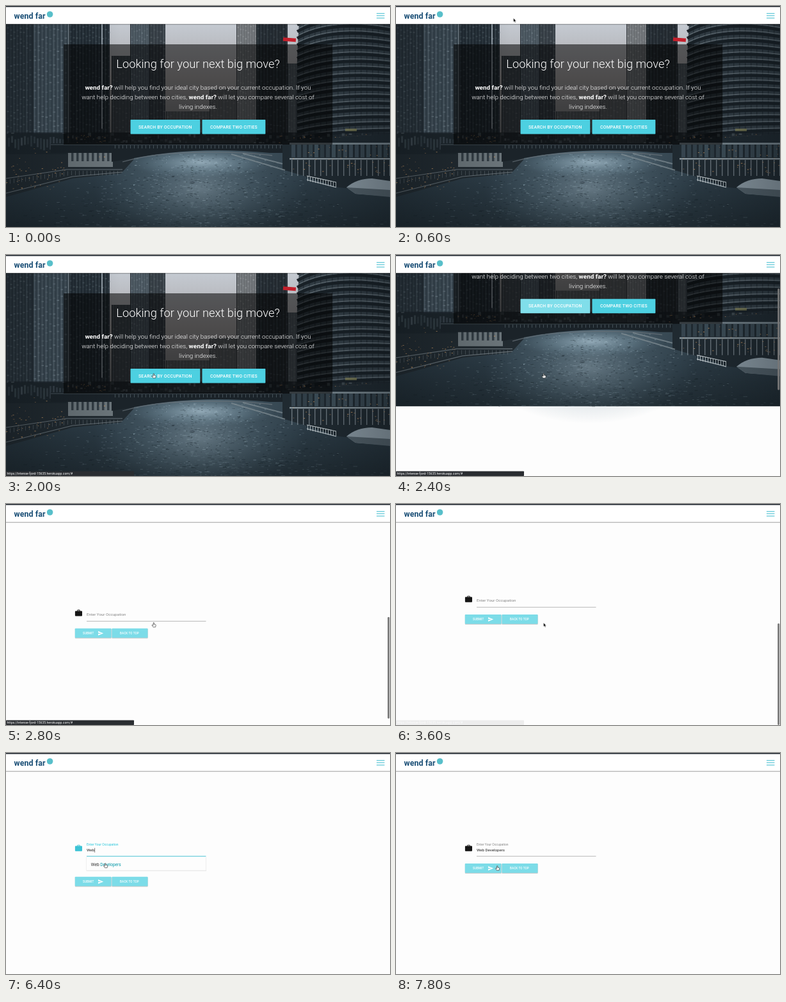
An HTML page for the animation above (8000 ms loop, 600x346 px).

```html
<!DOCTYPE html>
<html lang="en">
<head>
<meta charset="utf-8">
<title>City finder</title>
<style>
  html, body { margin: 0; width: 100%; height: 100%; overflow: hidden; background: #fdfdfd; }
  svg { display: block; width: 100vw; height: 100vh; font-family: Roboto, sans-serif; }
  .mid { text-anchor: middle; }
  .copy { font-size: 9.83px; font-weight: 300; fill: #fff; text-anchor: middle; }
  .copy tspan { font-weight: 700; }
  .cta { font-size: 6.85px; font-weight: 500; letter-spacing: .2px; fill: #fff; text-anchor: middle; }
  .small { font-size: 4.5px; font-weight: 500; letter-spacing: .17px; fill: #fff; }
  .option { font-size: 6.55px; fill: #0097a7; }
  .option .hit { fill: #333; }
</style>
</head>
<body>
<svg viewBox="0 0 600 346" preserveAspectRatio="none">
  <defs>
    <linearGradient id="sky" x2="0" y2="1">
      <stop offset=".1" stop-color="#c6ccd4"/><stop offset=".5" stop-color="#a9a6a7"/><stop offset="1" stop-color="#666a6e"/>
    </linearGradient>
    <linearGradient id="river" x2="0" y2="1">
      <stop stop-color="#3a4b56"/><stop offset=".45" stop-color="#2b3a44"/><stop offset="1" stop-color="#1f2a31"/>
    </linearGradient>
    <radialGradient id="glow">
      <stop stop-color="#a9c0cd" stop-opacity=".85"/><stop offset=".5" stop-color="#7f9aa9" stop-opacity=".45"/>
      <stop offset="1" stop-color="#5f7b8b" stop-opacity="0"/>
    </radialGradient>
    <linearGradient id="edge">
      <stop stop-color="#060b0f" stop-opacity=".3"/><stop offset=".3" stop-color="#060b0f" stop-opacity="0"/>
      <stop offset=".75" stop-color="#060b0f" stop-opacity="0"/><stop offset="1" stop-color="#060b0f" stop-opacity=".3"/>
    </linearGradient>
  </defs>
  <rect width="600" height="346" fill="#fdfdfd"/>

  <g id="hero">
    <g id="photo"></g>
    <rect x="90" y="60" width="420" height="157" fill="#000" opacity=".54"/>
    <text class="mid" x="300" y="97.1" font-size="18.35" font-weight="300" fill="#fff">Looking for your next big move?</text>
    <text class="copy" x="300" y="130.8"><tspan>wend far?</tspan> will help you find your ideal city based on your current occupation. If you</text>
    <text class="copy" x="300" y="145.8">want help deciding between two cities, <tspan>wend far?</tspan> will let you compare several cost of</text>
    <text class="copy" x="300" y="160.8">living indexes.</text>
    <rect id="search" x="194.5" y="178" width="108.8" height="22.5" rx=".8"/>
    <rect x="306.5" y="178" width="98.9" height="22.5" rx=".8" fill="#4dd0e1"/>
    <text class="cta" x="248.8" y="191.7">SEARCH BY OCCUPATION</text>
    <text class="cta" x="356" y="191.7">COMPARE TWO CITIES</text>
  </g>

  <g id="form">
    <path id="bag" d="M108.9 145.6h2.5v-1q0-.9.9-.9h2.4q.9 0 .9.9v1h2.4q1 0 1 1v6.2q0 1-1 1h-9.1q-1 0-1-1v-6.2q0-1 1-1zm3.5 0h2.2v-1h-2.2z" fill-rule="evenodd"/>
    <text id="label" x="126">Enter Your Occupation</text>
    <text id="value" x="126" y="154.3" font-size="6.15" fill="#222"></text>
    <rect id="caret" y="148.7" width=".6" height="7" fill="#222"/>
    <rect id="line" x="126" width="186.5"/>
    <g id="buttons">
      <g fill="#000" opacity=".2">
        <rect x="107.8" y="173.6" width="56.9" height="15.2" rx=".8"/><rect x="165.3" y="173.6" width="56.4" height="15.2" rx=".8"/>
      </g>
      <g fill="#7cdce8">
        <rect x="107.8" y="173" width="56.7" height="14.8" rx=".8"/><rect x="165.5" y="173" width="56" height="14.8" rx=".8"/>
      </g>
      <text class="small" x="120" y="182">SUBMIT</text>
      <path d="M144 177.2l8.2 3.4-8.2 3.4v-2.6l5.6-.8-5.6-.8z" fill="#fff"/>
      <text class="small" x="178" y="182">BACK TO TOP</text>
    </g>
    <g id="list"></g>
  </g>

  <rect id="thumb" x="596.3" width="2.9" height="159" rx="1.4" fill="#777"/>

  <rect y="28" width="600" height="1" fill="#000" opacity=".35"/>
  <rect y="29" width="600" height="1" fill="#000" opacity=".1"/>
  <rect width="600" height="28.2" fill="#fff"/>
  <rect width="600" height="1.6" fill="#232a31"/>
  <text x="12.6" y="20.2" font-size="12.5" font-weight="700" fill="#1c5077">wend far</text>
  <circle cx="68.6" cy="13" r="4.8" fill="#58bfca"/>
  <path d="M579 11.6h12.5M579 15.2h12.5M579 18.8h12.5" stroke="#62c8d8" stroke-width="1.3"/>

  <g id="status">
    <rect y="338.5" width="200" height="7.5" rx=".8" fill="#2a2d31"/>
    <text x="1.5" y="344" font-size="5.1" fill="#fff">https://intense-fjord-15635.herokuapp.com/#</text>
  </g>

  <path id="arrow" d="M0 0v6l1.4-1.2 1 2.2 1.1-.5-1-2.1h1.8z" fill="#111" stroke="#fff" stroke-width=".4"/>
  <path id="hand" d="M-.9-3.6q.7-.6 1.3 0v2.3l2 .5q.9.3.8 1.2l-.6 2.8h-3.7l-1.9-2.8q0-.9.9-.6l1.2.8z" fill="#fff" stroke="#222" stroke-width=".6"/>
</svg>

<script>
const $ = id => document.getElementById(id);
const set = (id, attrs) => { for (const k in attrs) $(id).setAttribute(k, attrs[k]); };
const show = (id, on) => set(id, { visibility: on ? 'visible' : 'hidden' });
const clamp = v => Math.max(0, Math.min(1, v));
const ramp = (t, a, b) => clamp((t - a) / (b - a));

let seed = 11;
const rnd = (a = 0, b = 1) => {
  seed = (seed * 16807) % 2147483647;
  return a + (b - a) * seed / 2147483647;
};
const box = (x, y, w, h, fill, op = 1) =>
  `<rect x="${x.toFixed(1)}" y="${y.toFixed(1)}" width="${w.toFixed(1)}" height="${h.toFixed(1)}" fill="${fill}" opacity="${op.toFixed(2)}"/>`;
const stroke = (d, color, width, op = 1) =>
  `<path d="${d}" fill="none" stroke="${color}" stroke-width="${width}" opacity="${op}"/>`;
const shape = (d, fill) => `<path d="${d}" fill="${fill}"/>`;

function tower(x, y, w, color, lit, gap) {
  let s = box(x, y, w, 225 - y, color);
  for (let i = x + 1.5; i < x + w - 1; i += gap) {
    s += box(i, y, gap * .35, 225 - y, lit, rnd(.15, .45));
    for (let j = y + rnd(0, 9); j < 218; j += rnd(6, 16)) s += box(i, j, gap * .6, 2, lit, rnd(.1, .6));
  }
  return s + box(x, y, 1, 225 - y, '#141b20', .6);
}

function lamps(count, x0, x1, y0, y1) {
  let s = '';
  while (count--) s += box(rnd(x0, x1), rnd(y0, y1), rnd(.8, 2.6), .9, '#dba46c', rnd(.4, .9));
  return s;
}

function drawCity() {
  let s = box(0, 2, 600, 220, 'url(#sky)');
  s += tower(0, 2, 42, '#273139', '#5c6971', 5) + tower(42, 2, 56, '#3a4852', '#7d8d98', 6);
  s += tower(98, 2, 64, '#222c34', '#5a6871', 5) + box(149, 2, 2, 190, '#aab6bf', .8) + box(97, 2, 1.5, 215, '#9aa8b2', .7);
  s += tower(165, 78, 30, '#3b434a', '#626a70', 5) + tower(194, 2, 30, '#46525b', '#76838b', 4);
  s += tower(224, 2, 25, '#343c43', '#666f76', 5);
  s += tower(250, 165, 70, '#50555a', '#7a7f83', 5) + tower(318, 130, 42, '#565a5e', '#7f8387', 5);
  s += tower(360, 2, 31, '#6b6f73', '#a2a6a9', 4) + tower(391, 2, 49, '#22292f', '#49535a', 5);
  s += tower(440, 90, 15, '#4c565d', '#7a858c', 4);

  // Round tower with curved balconies
  s += shape('M460 2H600V210H454Q452 90 460 2z', '#333e46');
  for (let x = 464; x < 600; x += 9) s += box(x, 2, 1.5, 208, '#141c22', .5);
  for (let y = 10; y < 225; y += 10.5) {
    const bulge = 34 - y * .11;
    s += stroke(`M455 ${y + 9}Q510 ${y + 9 - bulge} 600 ${y - 4}`, '#192127', 4.5);
    s += stroke(`M455 ${y + 5}Q510 ${y + 5 - bulge} 600 ${y - 8}`, '#9aa6ad', .9, .65);
  }
  s += '<rect x="433" y="50" width="20" height="5.5" fill="#c4202c" transform="rotate(4 443 52)"/>';

  // Street level
  s += box(0, 198, 600, 26, '#1a2228', .75);
  for (let x = 1; x < 600; x += rnd(3, 8)) s += box(x, rnd(198, 214), rnd(2, 5), rnd(2, 6), '#77838a', rnd(.1, .5));
  return s + lamps(50, 0, 160, 202, 216) + lamps(30, 420, 598, 200, 214);
}

function drawRiver() {
  let s = box(0, 222, 600, 124, 'url(#river)');
  s += '<ellipse cx="305" cy="245" rx="115" ry="24" fill="url(#glow)"/>';
  s += '<ellipse cx="302" cy="285" rx="165" ry="88" fill="url(#glow)" opacity=".55"/>';
  for (let i = 0; i < 1300; i++) {
    const y = 231 + 115 * Math.pow(rnd(), .8), near = (y - 225) / 120;
    const x = 302 + (rnd() + rnd() - 1) * (100 + 220 * near);
    const light = rnd() > .42;
    s += box(x, y, rnd(1, 3 + 4 * near), .8, light ? '#b0c6d2' : '#0d161c', light ? rnd(.1, .45) * (1.2 - near * .7) : rnd(.15, .5));
  }
  return s;
}

function drawBanks() {
  // Left quay
  let s = shape('M0 214H200V240L180 262 104 270 0 299z', '#222b31') + box(0, 200, 95, 32, '#1d262c');
  for (let x = 3; x < 92; x += 5) s += box(x, rnd(203, 210), 3, rnd(10, 20), '#54616a', rnd(.2, .6));
  s += box(97, 223, 70, 29, '#6d777c') + box(97, 221, 70, 3, '#8b9599');
  for (let x = 102; x < 164; x += 8) s += box(x, 229, 3.5, 14, '#333d44');
  s += stroke('M0 270L95 256H182M0 293L104 267 182 260', '#7f8a90', 1.2, .75);
  for (let x = 0; x < 180; x += 6) s += box(x, 258 + Math.max(0, 100 - x) * .14, .8, 7, '#7f8a90', .5);
  s += lamps(45, 0, 92, 250, 287) + lamps(12, 0, 170, 222, 258);

  // Bridge
  s += shape('M70 215H520V230H412Q300 219 200 238L165 244V230H70z', '#1b2329');
  s += stroke('M182 244Q230 230 300 229T416 234', '#69747b', 1.3, .8) + stroke('M70 217H520', '#5b686f', 1, .8);
  for (let x = 170; x < 450; x += 6) s += box(x, 218, 1, 5, '#58656d', .7);

  // Right bank, dock and boat
  s += shape('M600 200L432 212V256L472 268 520 284 600 292z', '#202a31');
  s += box(443, 214, 157, 3, '#76848c') + box(443, 238, 157, 2.5, '#87949b');
  for (let x = 446; x < 600; x += 9) s += box(x, 217, 6, 20, '#465863', rnd(.4, .9)) + box(x, 241, 1.4, 25, '#8b989f', .7);
  s += lamps(45, 446, 598, 217, 262) + box(530, 192, 18, 4, '#8a8958', .7);
  s += stroke('M352 232L436 257M370 231L432 247', '#7d8a91', 2, .75);
  s += stroke('M470 266L516 276M470 272L516 284', '#c4cdd1', 1.2);
  for (let x = 471; x < 517; x += 4) s += box(x, 266 + (x - 470) * .22, 1, 8, '#c4cdd1', .8);
  return s + shape('M532 284Q548 270 572 270L600 274V298L546 294z', '#8d9ca6') + shape('M532 284L600 288V299L546 294z', '#53616a');
}

function drawPhoto() {
  $('photo').innerHTML = drawCity() + drawRiver() + drawBanks() + box(0, 2, 600, 344, 'url(#edge)');
}

const OPTIONS = [
  ['Wholesale and Retail Buyers, Except Farm Products'],
  ['Purchasing Agents, Except Wholesale, Retail, and Farm', 'Products'],
  ['Insurance Underwriters'], ['Software Developers, Applications'],
  ['Software Developers, Systems Software'], ['Web Developers'],
  ['Network and Computer Systems Administrators'], ['Computer Network Architects']
];
let listed = null;

// Marks the first match in each option
function drawList(query) {
  if (query === listed) return;
  listed = query;
  let y = 163, rows = '';
  for (const lines of query ? OPTIONS : []) {
    const at = lines[0].toLowerCase().indexOf(query);
    if (at < 0) continue;
    lines.forEach((line, i) => {
      const end = at + query.length;
      const text = i ? line : `${line.slice(0, at)}<tspan class="hit">${line.slice(at, end)}</tspan>${line.slice(end)}`;
      rows += `<text class="option" xml:space="preserve" x="132.8" y="${y + 13.9 + i * 9}">${text}</text>`;
    });
    y += 20.8 + (lines.length - 1) * 9.2;
  }
  if (query === 'w') y = 380;
  $('list').innerHTML = query ? box(125.6, 163, 187.4, y - 162.2, '#000', .13) + box(126, 163, 186.5, y - 163, '#fdfdfd') + rows : '';
  set('buttons', { transform: `translate(0 ${y - 163})` });
}

const PATH = [
  [400, 181, 4], [600, 183.5, 19], [1000, 203, 86], [1400, 226, 168], [1600, 230.5, 186], [3600, 230.5, 186],
  [4000, 178, 160], [4200, 160, 151], [5800, 160, 157], [6200, 155, 173], [6800, 155, 173], [7400, 158, 177], [8000, 158, 177]
];
function pointer(t) {
  const i = Math.max(1, PATH.findIndex(p => p[0] >= t));
  const [a, b] = [PATH[i - 1], PATH[i]], k = ramp(t, a[0], b[0]);
  return [a[1] + (b[1] - a[1]) * k, a[2] + (b[2] - a[2]) * k];
}

function render(t) {
  const scroll = 400 * (.5 - Math.cos(Math.PI * ramp(t, 2120, 2920)) / 2);
  set('hero', { transform: `translate(0 ${-scroll})` });
  set('form', { transform: `translate(0 ${400 - scroll})` });
  set('search', { fill: t >= 2200 ? '#80deea' : '#4dd0e1' });
  set('thumb', { y: 2 + scroll * .4625, opacity: t < 2200 ? 0 : 1 - ramp(t, 3600, 4200) });
  set('status', { opacity: t < 1600 ? 0 : 1 - .93 * ramp(t, 3200, 3600) - .07 * ramp(t, 3600, 3800) });

  const focus = t >= 4400 && t < 6800;
  const picked = t >= 6800;
  const float = ramp(t, 4300, 4500);
  set('label', { y: 153.2 - 8.1 * float, 'font-size': 6.2 - 1.2 * float, fill: focus ? '#26c6da' : '#858585' });
  set('bag', { fill: focus ? '#3cc3d5' : '#151515' });
  set('line', { y: focus ? 161.2 : 161.5, height: focus ? 1 : .6, fill: focus ? '#4dc4d5' : '#8c8c8c' });

  const typed = picked ? 'Web Developers' : 'Web'.slice(0, t < 4800 ? 0 : t < 5200 ? 1 : t < 5400 ? 2 : 3);
  $('value').textContent = typed;
  set('caret', { x: 126.4 + (typed ? $('value').getComputedTextLength() : 0) });
  show('caret', focus);
  drawList(picked || t < 5000 ? '' : t < 5400 ? 'w' : 'web');

  const [x, y] = pointer(t);
  const seen = t >= 400 && (t < 4800 || t >= 5800);
  const hand = (t >= 1600 && t < 3200) || t >= 6200;
  show('arrow', seen && !hand);
  show('hand', seen && hand);
  set('arrow', { transform: `translate(${x} ${y})` });
  set('hand', { transform: `translate(${x + .5} ${y + 3.5})` });
}

drawPhoto();
const LOOP = 8000, STEP = 200;
const start = performance.now();
function tick() {
  const t = (performance.now() - start) % LOOP;
  render(Math.floor(t / STEP) * STEP);
  requestAnimationFrame(tick);
}
tick();
</script>
</body>
</html>
```
